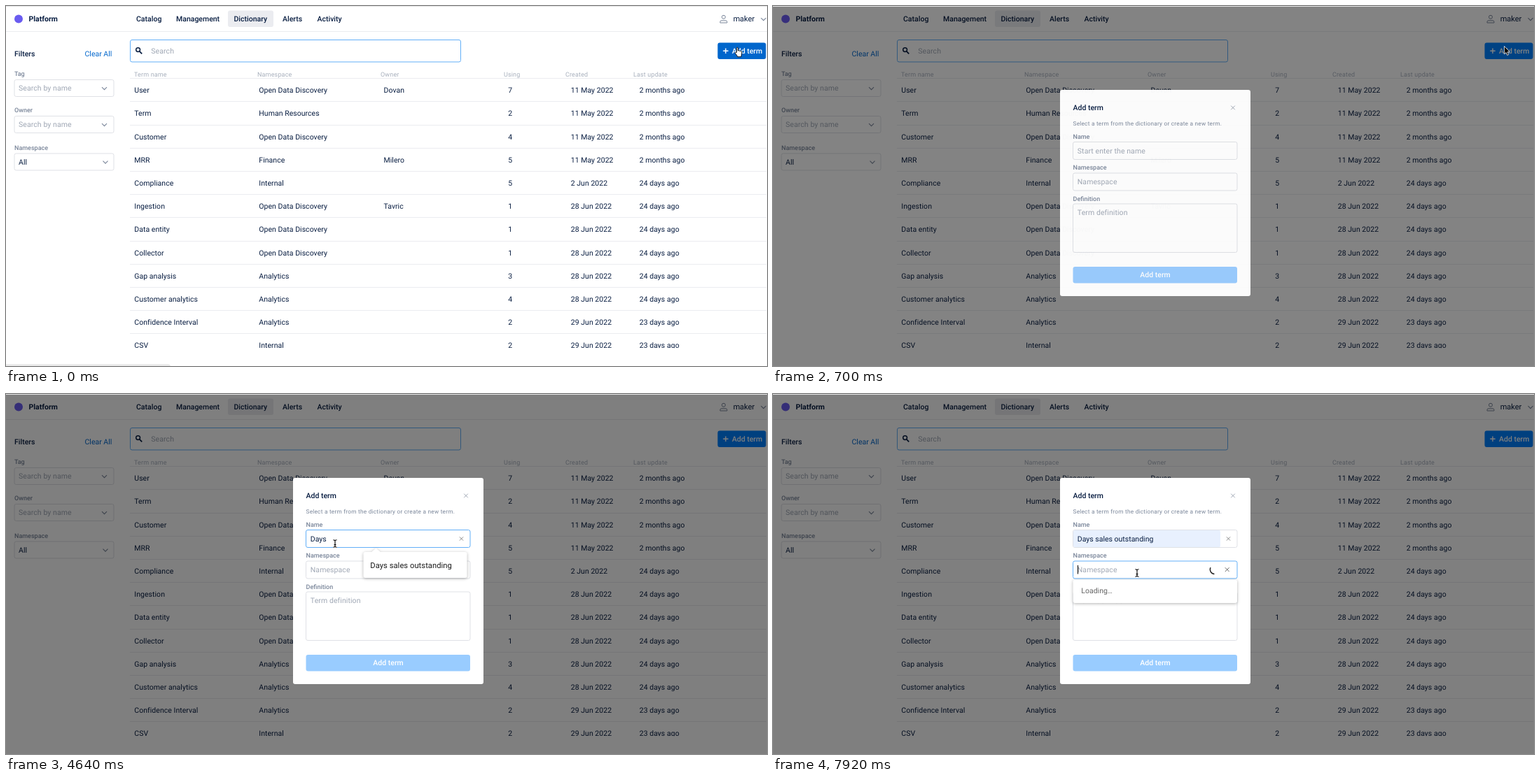
Recreate the animation shown at these times as an HTML page. Size 1087 by 515 pixels, loop 8000 ms.

```html
<!DOCTYPE html>
<html lang="en">
<head>
<meta charset="utf-8">
<title>Dictionary: add a term</title>
<style>
  html, body { margin: 0; width: 100%; height: 100%; overflow: hidden; background: #fff; }
  svg { display: block; width: 1087px; height: 515px; }
  text { font: 400 10.5px Roboto, Arial, sans-serif; fill: #091e42; white-space: pre; text-rendering: geometricPrecision; }
  .cell { letter-spacing: .04px; }
  .strong { font-weight: 500; }
  .brand { font-weight: 700; }
  .user { font-size: 11px; }
  .head { font-size: 9px; fill: #a8b0bd; letter-spacing: .15px; }
  .label { font-size: 9px; font-weight: 500; fill: #7a869a; }
  .hint { fill: #a0a8b5; letter-spacing: .08px; }
  .sub { font-size: 8.25px; fill: #7a869a; letter-spacing: .24px; }
  .link { fill: #0066cc; }
  .white { fill: #fff; font-weight: 500; }
  .item { font-size: 11.2px; fill: #1a1a1a; letter-spacing: .04px; }
  .muted { fill: #666; }
  .popup { filter: drop-shadow(0 1px 2px rgba(0, 0, 0, .3)); }
</style>
</head>
<body>
<svg id="stage" viewBox="0 0 1087 515"></svg>
<script>
const LOOP = 8000;
const LINE = '#ebecf0', BORDER = '#dfe1e6', FOCUS = '#62aff8', INK = '#091e42', GREY = '#7a869a';

function add(parent, tag, attrs = {}) {
  const el = document.createElementNS('http://www.w3.org/2000/svg', tag);
  for (const key in attrs) el.setAttribute(key, attrs[key]);
  parent.appendChild(el);
  return el;
}
const group = (parent, attrs) => add(parent, 'g', attrs);
const rect = (parent, x, y, width, height, fill, rx = 0) =>
  add(parent, 'rect', { x, y, width, height, fill, rx });
const stroke = (parent, d, color, width = 1) =>
  add(parent, 'path', { d, fill: 'none', stroke: color, 'stroke-width': width });
function write(parent, x, y, string, name, anchor = 'start') {
  const el = add(parent, 'text', { x, y, class: name, 'text-anchor': anchor });
  el.textContent = string;
  return el;
}
function box(parent, x, y, width, height, color = BORDER) {
  const el = rect(parent, x + .5, y + .5, width - 1, height - 1, '#fff', 2.5);
  el.setAttribute('stroke', color);
  return el;
}
const chevron = (parent, x, y) => stroke(parent, `M${x - 3.5} ${y - 1.7}l3.5 3.5 3.5-3.5`, GREY, 1.1);
const cross = (parent, x, y, r, color) =>
  stroke(parent, `M${x - r} ${y - r}l${2 * r} ${2 * r}M${x + r} ${y - r}l${-2 * r} ${2 * r}`, color);
const show = (el, on) => el.setAttribute('visibility', on ? 'visible' : 'hidden');

const stage = document.getElementById('stage');

// Page header
const page = group(stage);
rect(page, 0, 0, 1087, 515, '#fff');
rect(page, 0, 36, 1087, 1, LINE);
add(page, 'circle', { cx: 18, cy: 18.5, r: 6, fill: '#6a5cf0' });
write(page, 32.5, 22.2, 'Platform', 'brand');
rect(page, 317, 6.5, 65, 23.5, LINE, 3);
[[186, 'Catalog'], [243, 'Management'], [325.5, 'Dictionary'], [395, 'Alerts'], [444.5, 'Activity']]
  .forEach(([x, name]) => write(page, x, 22, name, 'strong'));
add(page, 'circle', { cx: 1025, cy: 15.8, r: 2.5, fill: 'none', stroke: GREY });
stroke(page, 'M1020 24v-1.2q0-2 2-2h6q2 0 2 2v1.2z', GREY);
write(page, 1038.7, 22.2, 'maker', 'user');
chevron(page, 1082, 18.8);

// Filters
write(page, 12, 71.8, 'Filters', 'strong');
write(page, 112.5, 71.8, 'Clear All', 'link');
[['Tag', 105, 'Search by name'], ['Owner', 157, 'Search by name'], ['Namespace', 210.5, 'All']]
  .forEach(([name, y, value]) => {
    const all = value === 'All';
    write(page, 12, y - 4.8, name, 'label');
    box(page, 11.5, y, 143, 25);
    write(page, 18, y + 16.3, value, all ? 'cell' : 'hint');
    chevron(page, all ? 142 : 140.5, y + 12.8);
  });

// Search and button
box(page, 177, 48, 473, 32.5, FOCUS);
add(page, 'circle', { cx: 188.6, cy: 62.6, r: 2.9, fill: 'none', stroke: INK, 'stroke-width': 1.5 });
stroke(page, 'M190.8 64.8l3.4 3.5', INK, 1.8);
write(page, 207.3, 67.8, 'Search', 'hint');
const addButton = rect(page, 1016.5, 52.5, 69, 23.5, '#0066cc', 3);
stroke(page, 'M1024.3 64.3h7.4M1028 60.6v7.4', '#fff', 1.4);
write(page, 1037, 68, 'Add term', 'white');

// Terms
const heads = ['Term name', 'Namespace', 'Owner', 'Using', 'Created', 'Last update'];
[183, 359, 535, 711, 799, 896].forEach((x, i) => write(page, x, 100.8, heads[i], 'head'));
const clip = add(add(page, 'defs'), 'clipPath', { id: 'list' });
rect(clip, 0, 100, 1087, 389.3, '#000');
const list = group(page, { 'clip-path': 'url(#list)' });
const ODD = 'Open Data Discovery', MAY = '11 May 2022', JUN = '28 Jun 2022', LATE = '29 Jun 2022';
[
  ['User', ODD, 'Dovan', 7, MAY, '2 months'],
  ['Term', 'Human Resources', '', 2, MAY, '2 months'],
  ['Customer', ODD, '', 4, MAY, '2 months'],
  ['MRR', 'Finance', 'Milero', 5, MAY, '2 months'],
  ['Compliance', 'Internal', '', 5, '2 Jun 2022', '24 days'],
  ['Ingestion', ODD, 'Tavric', 1, JUN, '24 days'],
  ['Data entity', ODD, '', 1, JUN, '24 days'],
  ['Collector', ODD, '', 1, JUN, '24 days'],
  ['Gap analysis', 'Analytics', '', 3, JUN, '24 days'],
  ['Customer analytics', 'Analytics', '', 4, JUN, '24 days'],
  ['Confidence Interval', 'Analytics', '', 2, LATE, '23 days'],
  ['CSV', 'Internal', '', 2, LATE, '23 days']
].forEach((row, i) => {
  const y = 124.1 + i * 33.2;
  rect(list, 177, Math.round(y - 21), 909, 1, LINE);
  [183.3, 361.3, 539.5, 717.3, 806.7, 904.7].forEach((x, c) =>
    write(list, x, y, c === 5 ? row[c] + ' ago' : row[c], 'cell'));
});
const status = rect(stage, -5, 512.3, 240, 10, '#e9e9e9', 4);

// Backdrop and dialog
const shade = rect(stage, 0, 1, 1087, 514, '#000');
rect(stage, 0, 0, 1087, 1, '#e4e4e4');
const dialog = group(stage);
rect(dialog, 410, 120, 272, 295, '#fff', 3);
write(dialog, 428.5, 149.2, 'Add term', 'strong');
cross(dialog, 657, 145.5, 2.8, '#a0a8b5');
write(dialog, 428.5, 170.5, 'Select a term from the dictionary or create a new term.', 'sub');
[['Name', 189.8], ['Namespace', 234], ['Definition', 278.6]]
  .forEach(([name, y]) => write(dialog, 428.5, y, name, 'label'));
const nameBox = box(dialog, 428, 194, 235.5, 26);
const spaceBox = box(dialog, 428, 238.5, 235.5, 26);
box(dialog, 428, 282.5, 235.5, 70.5);
const chosen = rect(dialog, 429, 195, 210, 24, '#e8f0fe', 2);
const nameHint = write(dialog, 434.8, 210.8, 'Start enter the name', 'hint');
const nameText = write(dialog, 434.8, 210.8, '', '');
const nameCross = cross(dialog, 650.5, 207, 2.6, '#8a8a8a');
const nameCaret = rect(dialog, 435, 201, 1, 12, '#000');
write(dialog, 434.8, 255, 'Namespace', 'hint');
write(dialog, 434.8, 299.3, 'Term definition', 'hint');
rect(dialog, 428.5, 373, 234.5, 23.5, '#99ccff', 3);
write(dialog, 546, 388.2, 'Add term', 'white', 'middle');

// Suggestions
const PITCH = 29.5;
const menu = group(stage);
const menuPaper = group(menu, { class: 'popup' });
add(menuPaper, 'path', { d: 'M521 227l7.5-6.5 7.5 6.5z', fill: '#fff' });
const menuBody = rect(menuPaper, 510.5, 226, 148, 37, '#fff', 3);
const menuHover = rect(menu, 510.5, 230, 148, PITCH, '#f5f5f5');
const menuItems = Array.from({ length: 6 }, (_, i) => write(menu, 520.3, 248.8 + i * PITCH, '', 'item'));

// Namespace lookup
const lookup = group(stage);
rect(group(lookup, { class: 'popup' }), 428.5, 265.5, 234.5, 33.5, '#fff', 3);
write(lookup, 440.3, 285, 'Loading…', 'muted');
cross(lookup, 648.7, 251.2, 2.9, '#666');
rect(lookup, 435, 245, 1, 12.5, '#000');
const spinner = stroke(lookup, '', '#222', 1.5);

// Pointers
const arrow = add(stage, 'path', {
  d: 'M0 0V11.3L2.6 9 4.3 12.9 6.2 12.1 4.6 8.3H8Z', fill: '#000', stroke: '#fff', 'stroke-width': .8
});
const hand = add(stage, 'path', {
  d: 'M2.6 8V1.6a1 1 0 0 1 2 0V5.5c.2-.8 1.8-.8 1.9.2.3-.7 1.7-.6 1.8.4.4-.5 1.5-.3 1.5.7V10c0 1.6-.9 2.2-.9 4H3.8C3.6 12 1.5 10.6.5 8.6c-.4-1 .8-1.6 1.5-.8z',
  fill: '#fff', stroke: '#000', 'stroke-width': .9
});
const beam = group(stage);
const beamPath = 'M-2.6-5.2q2.6 0 2.6 1.4 0-1.4 2.6-1.4M-2.6 5.2q2.6 0 2.6-1.4 0 1.4 2.6 1.4M0-4V4M-1.4 1.6h2.8';
stroke(beam, beamPath, '#fff', 2.2);
stroke(beam, beamPath, '#000', 1.1);
const pointers = { arrow, hand, beam };

// Step tables: [time, value...], each row holds until the next
const FADE = [[0, 0], [500, .05], [560, .2], [620, .54], [700, .97], [820, 1]];
const POINTER = [
  [0, 'hand', 1041, 58.7], [80, 'hand', 1040.5, 58.7], [500, 'arrow', 1044.5, 57.5],
  [820, 'arrow', 900, 140], [1060, 'arrow', 712, 221],
  [1780, 'arrow', 665, 213.5], [1870, 'beam', 560, 211], [1960, 'beam', 450, 210],
  [2050, 'arrow', 388, 212], [2130, 'beam', 440, 213], [2210, 'beam', 470, 214],
  [6250, 'beam', 520, 217], [6340, 'arrow', 568, 231.5], [6430, 'arrow', 571, 238],
  [6520, 'arrow', 572, 243], [6680, 'beam', 572, 247], [6770, 'beam', 570, 249], [6860, 'beam', 568, 250],
  [7130, 'beam', 556, 252], [7220, 'beam', 538, 254], [7310, 'beam', 525, 255], [7400, 'beam', 520, 256]
];
const TYPED = [
  [0, ''], [2750, 'D'], [3470, 'Da'], [3830, 'Day'], [3920, 'Days'], [4100, 'Days '], [5440, 'Days s'],
  [5620, 'Days sa'], [5710, 'Days sal'], [5890, 'Days sale'], [6610, 'Days sales outstanding']
];
const CARET = [[0, 0], [2570, 1], [3290, 0], [3470, 1], [4640, 0], [5080, 1], [6610, 0]];
const DSO = 'Days sales outstanding';
const MENU = [
  [0], [2570, 'User', 'Term', 'Customer', 'MRR', 'Compliance', 'Ingestion'],
  [2750, 'Data entity', 'Da', DSO, 'Denormalization'],
  [3470, 'Data entity', 'Da', DSO], [3830, DSO], [6610]
];
const OPEN = 500, FOCUS_NAME = 2570, HOVER = 6430, PICK = 6610, FOCUS_SPACE = 7490;

const held = (table, t) => table.filter(row => row[0] <= t).pop().slice(1);

function arc(cx, cy, r, from, to) {
  const point = deg => {
    const a = deg * Math.PI / 180;
    return `${cx + r * Math.cos(a)} ${cy + r * Math.sin(a)}`;
  };
  return `M${point(from)}A${r} ${r} 0 0 1 ${point(to)}`;
}

function draw(t) {
  const [fade] = held(FADE, t);
  shade.setAttribute('opacity', fade * .5);
  dialog.setAttribute('opacity', fade);
  show(status, t < OPEN);
  addButton.setAttribute('fill', t < OPEN ? '#0066cc' : '#0080ff');

  const [typed] = held(TYPED, t);
  nameText.textContent = typed;
  show(nameHint, !typed);
  show(nameCross, t >= FOCUS_NAME);
  show(chosen, t >= PICK);
  show(nameCaret, held(CARET, t)[0]);
  nameCaret.setAttribute('x', Math.round(435 + (typed ? nameText.getComputedTextLength() : 0)));
  nameBox.setAttribute('stroke', t >= FOCUS_NAME && t < FOCUS_SPACE ? FOCUS : BORDER);
  spaceBox.setAttribute('stroke', t >= FOCUS_SPACE ? FOCUS : BORDER);

  const items = held(MENU, t);
  menu.style.display = items.length ? '' : 'none';
  menuBody.setAttribute('height', 7.5 + PITCH * items.length);
  menuItems.forEach((el, i) => { el.textContent = items[i] || ''; });
  menuHover.style.display = t >= HOVER && t < PICK ? '' : 'none';

  lookup.style.display = t >= FOCUS_SPACE ? '' : 'none';
  if (t >= FOCUS_SPACE) {
    const lag = Math.ceil((7920 - t) / 86) * 86;
    const tail = 95 - lag * 360 / 1400;
    spinner.setAttribute('d', arc(631, 251, 6.6, tail, tail + 110 - lag * .24));
  }

  const [kind, x, y] = held(POINTER, t);
  for (const name in pointers) show(pointers[name], name === kind);
  pointers[kind].setAttribute('transform', `translate(${x} ${y})`);
}

function tick() {
  draw(performance.now() % LOOP);
  requestAnimationFrame(tick);
}
tick();
</script>
</body>
</html>
```
